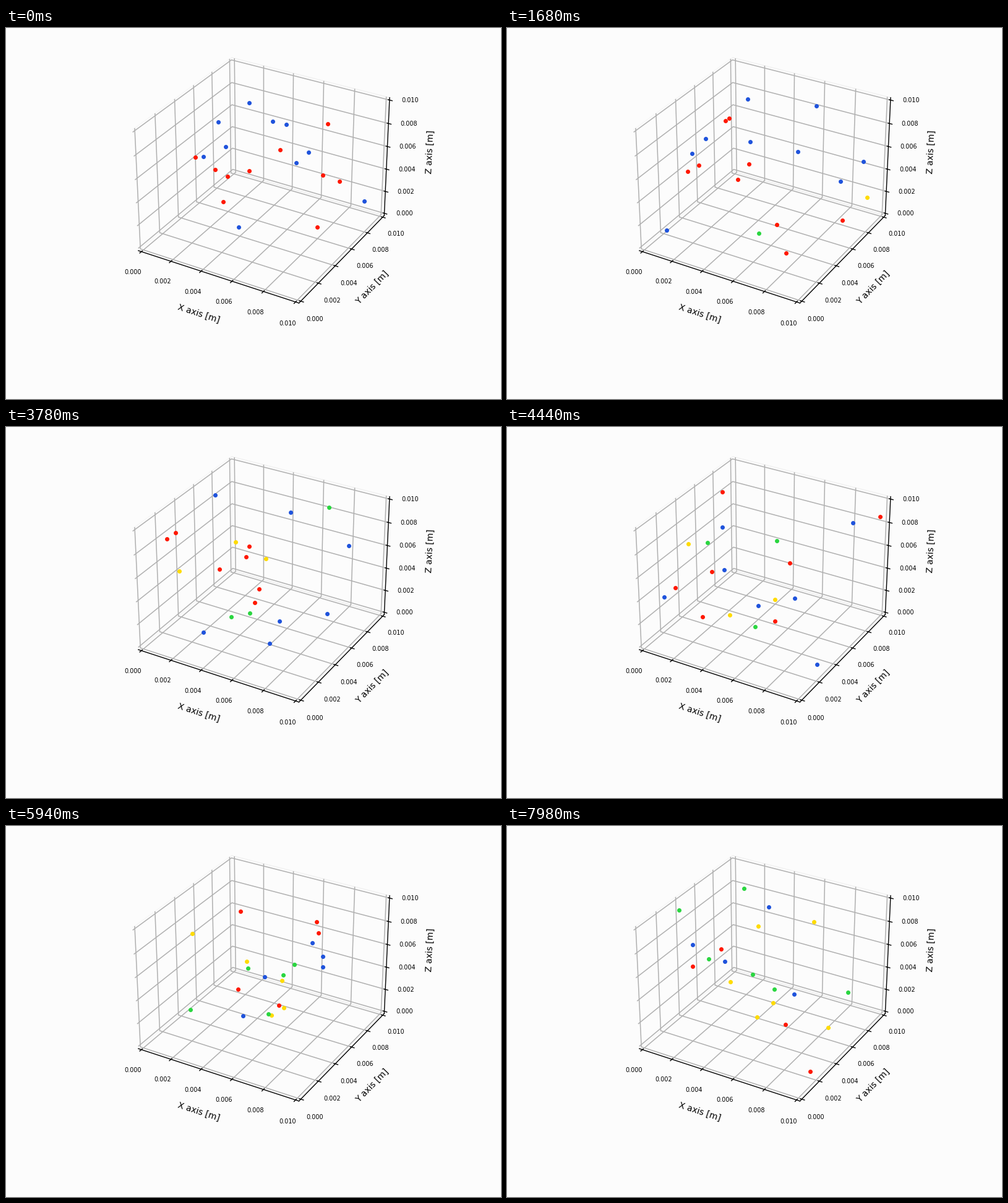
A matplotlib script that plays this animation: 800 px wide and 600 px high, repeating every 8000 ms.

```python
import numpy as np
import matplotlib.pyplot as plt
from matplotlib.animation import FuncAnimation

SIDE = 0.01                            # edge of the box in metres
PAIRS = 10                             # ten reds and ten blues at the start
FRAMES, STEP_MS = 267, 30
SPEED = 0.06                           # box edges per frame, along each axis
HITS = [30, 75, 110, 150, 190, 210]    # frames at which a red/blue pair reacts
RED, BLUE, YELLOW, GREEN = "#ff1800", "#1f53dc", "#ffdb00", "#2ad640"
BACK = "#fcfcfc"

plt.rcParams.update({"grid.linewidth": 1.1, "axes.linewidth": 1.0,
                     "xtick.major.width": 1.0, "ytick.major.width": 1.0})


def make_axes():
    fig = plt.figure(figsize=(8, 6), dpi=100, facecolor=BACK)
    ax = fig.add_axes([0.125, 0.21, 0.775, 0.77], projection="3d",
                      facecolor=BACK)
    pad = SIDE / 48
    limits = (-pad, SIDE + pad)
    ax.set(xlim=limits, ylim=limits, zlim=limits)
    for axis, name in zip((ax.xaxis, ax.yaxis, ax.zaxis), "XYZ"):
        axis.set_ticks(np.linspace(0, SIDE, 6))
        axis.set_major_formatter("{x:.3f}")
        axis.set_tick_params(labelsize=7, pad=6.7)
        axis.set_label_text(f"{name} axis [m]", fontsize=10)
        axis.labelpad = 10.25
        axis.pane.set_fill(False)
    return fig, ax


def make_gas(seed):
    """Each particle passes its spot at its hit frame and changes course there.

    The two halves of a reacting pair share both spot and hit frame.
    """
    rng = np.random.default_rng(seed)
    spot = rng.uniform(0, 1, (2, PAIRS, 3))
    before, after = rng.normal(0, SPEED, (2, 2, PAIRS, 3))
    hit = np.zeros((2, PAIRS, 1))
    count = len(HITS)
    spot[1, :count] = spot[0, :count]
    hit[:, :count, 0] = HITS
    return spot, hit, before, after


def positions(n):
    """Free flight, folded back between the walls at 0 and 1."""
    t = n - hit
    free = spot + before * np.minimum(t, 0) + after * np.maximum(t, 0)
    return SIDE * np.abs((free + 1) % 2 - 1)


fig, ax = make_axes()
spot, hit, before, after = make_gas(seed=7)
dots = [ax.plot([], [], [], "o", ms=4, color=c)[0]
        for c in (RED, BLUE, YELLOW, GREEN)]


def update(n):
    done = sum(n >= h for h in HITS)
    first, second = positions(n)
    groups = first[done:], second[done:], first[:done], second[:done]
    for dot, pts in zip(dots, groups):
        dot.set_data_3d(*pts.T)
    return dots


anim = FuncAnimation(fig, update, frames=FRAMES, interval=STEP_MS,
                     repeat=True, repeat_delay=0, blit=False)
plt.show()
```
